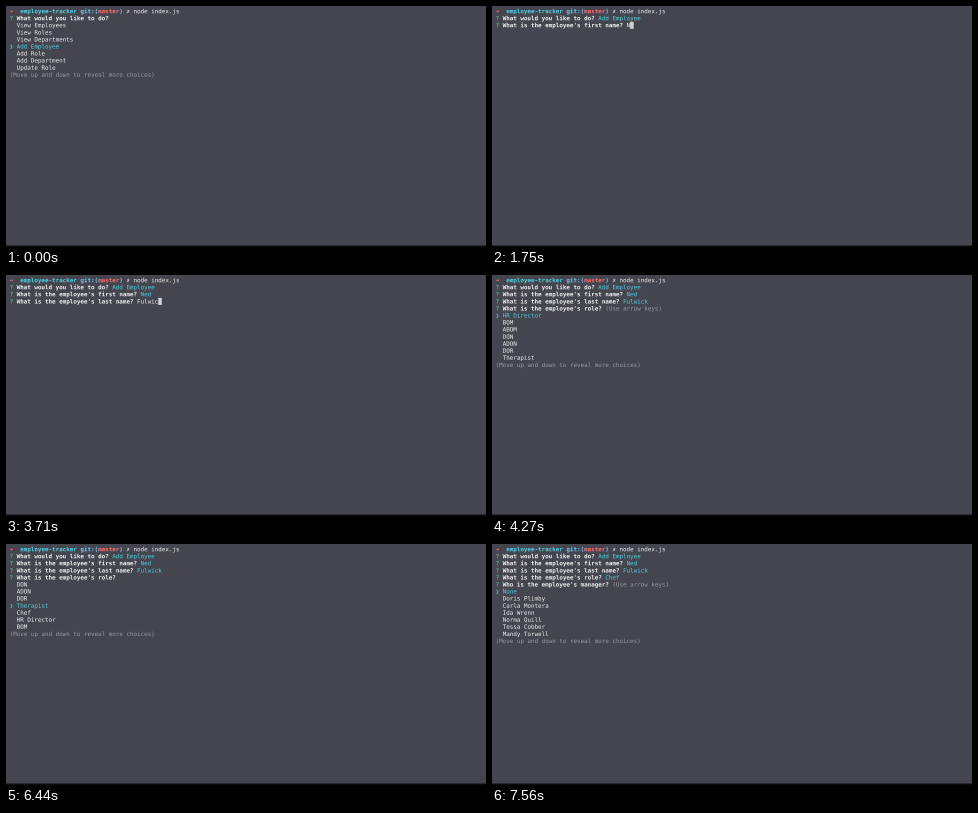
Write an HTML page with a canvas that moves like this. It is 480 px wide and 241 px high and loops after 8000 ms.

```html
<!DOCTYPE html>
<html lang="en">
<head>
<meta charset="utf-8">
<title>Employee tracker</title>
<style>
  html, body { margin: 0; width: 100%; height: 100%; overflow: hidden; background: #454550; }
  canvas { display: block; width: 480px; height: 241px; }
</style>
</head>
<body>
<canvas id="stage" width="480" height="241"></canvas>
<script>
const W = 480, H = 241, LOOP = 8000, SCALE = 4;
const LEFT = 3.6, TOP = 1.7, CELL = 3.54, ROW = 7.06, SIZE = 5.88, BASE = 5.5;
const C = {
  bg: '#454550', edge: '#0b0b0e', text: '#f1f1f0', dim: '#9b9ba2', cursor: '#d4d4d6',
  cyan: '#4fd3e2', blue: '#6ecdf5', green: '#6fd79b', red: '#ff6e6b'
};

const menu = ['View Employees', 'View Roles', 'View Departments', 'Add Employee',
  'Add Role', 'Add Department', 'Update Role'];
const roles = ['HR Director', 'BOM', 'ABOM', 'DON', 'ADON', 'DOR', 'Therapist', 'Chef'];
const managers = ['None', 'Doris Plimby', 'Carla Montera', 'Ida Wrenn', 'Norma Quill',
  'Tessa Cobber', 'Mandy Torwell'];

// Times in ms: submitted answers, key strokes and arrow presses
const ENTER = { menu: 770, first: 2170, last: 4200, role: 7280 };
const first = { text: 'Ned', keys: [1750, 1890, 1960] };
const last = { text: 'Fulwick', keys: [2660, 3080, 3220, 3430, 3570, 3710, 3850] };
const roleKeys = [5390, 5530, 5670, 5950, 6090, 6300, 6650];

const stage = document.getElementById('stage').getContext('2d');
const sheet = document.createElement('canvas');
sheet.width = W * SCALE;
sheet.height = H * SCALE;
const ctx = sheet.getContext('2d');
stage.imageSmoothingQuality = 'high';

const count = (keys, t) => keys.filter(k => k <= t).length;
const typed = (field, t) => field.text.slice(0, count(field.keys, t));
const run = (text, color = C.text, bold = false) => ({ text, color, bold });
const ask = (question, ...rest) => [run('? ', C.green), run(question + ' ', C.text, true), ...rest];
const answered = (question, answer) => ask(question, run(answer, C.cyan));
const typing = (question, field, t) => ask(question, run(typed(field, t)), run('\u2588', C.cursor));
const hint = run('(Use arrow keys)', C.dim);

// Seven visible rows; the pointer stops at the fourth and the list scrolls under it
function choices(items, index) {
  const pointer = Math.min(index, 3);
  const rows = Array.from({ length: 7 }, (_, i) => {
    const item = items[(index - pointer + i) % items.length];
    return i === pointer ? [run('\u276f ' + item, C.cyan)] : [run('  ' + item)];
  });
  return [...rows, [run('(Move up and down to reveal more choices)', C.dim)]];
}

const prompt = [
  run('\u279c  ', C.red, true), run('employee-tracker ', C.cyan, true),
  run('git:(', C.blue, true), run('master', C.red, true), run(') ', C.blue, true),
  run('\u2717 ', C.text, true), run('node index.js')
];

const Q = {
  menu: 'What would you like to do?',
  first: "What is the employee's first name?",
  last: "What is the employee's last name?",
  role: "What is the employee's role?",
  boss: "Who is the employee's manager?"
};

function screen(t) {
  if (t < ENTER.menu) return [prompt, ask(Q.menu), ...choices(menu, 3)];
  const lines = [prompt, answered(Q.menu, 'Add Employee')];
  if (t < ENTER.first) return [...lines, typing(Q.first, first, t)];
  lines.push(answered(Q.first, first.text));
  if (t < ENTER.last) return [...lines, typing(Q.last, last, t)];
  lines.push(answered(Q.last, last.text));
  if (t < ENTER.role) {
    const index = count(roleKeys, t);
    return [...lines, index ? ask(Q.role) : ask(Q.role, hint), ...choices(roles, index)];
  }
  lines.push(answered(Q.role, 'Chef'));
  return [...lines, ask(Q.boss, hint), ...choices(managers, 0)];
}

function drawLine(line, row) {
  const y = TOP + row * ROW;
  let col = 0;
  for (const { text, color, bold } of line) {
    ctx.fillStyle = color;
    ctx.font = `${bold ? 'bold ' : ''}${SIZE}px "DejaVu Sans Mono", monospace`;
    for (const ch of text) {
      const x = LEFT + col++ * CELL;
      if (ch === '\u2588') ctx.fillRect(x, y, CELL, ROW);
      else if (ch !== ' ') ctx.fillText(ch, x, y + BASE);
    }
  }
}

function draw(t) {
  ctx.setTransform(SCALE, 0, 0, SCALE, 0, 0);
  ctx.fillStyle = C.bg;
  ctx.fillRect(0, 0, W, H);
  ctx.fillStyle = C.edge;
  ctx.fillRect(0, H - 1.5, W, 1.5);
  screen(t).forEach(drawLine);
  stage.drawImage(sheet, 0, 0, W, H);
}

const start = performance.now();
function tick() {
  draw((performance.now() - start) % LOOP);
  requestAnimationFrame(tick);
}
tick();
</script>
</body>
</html>
```
